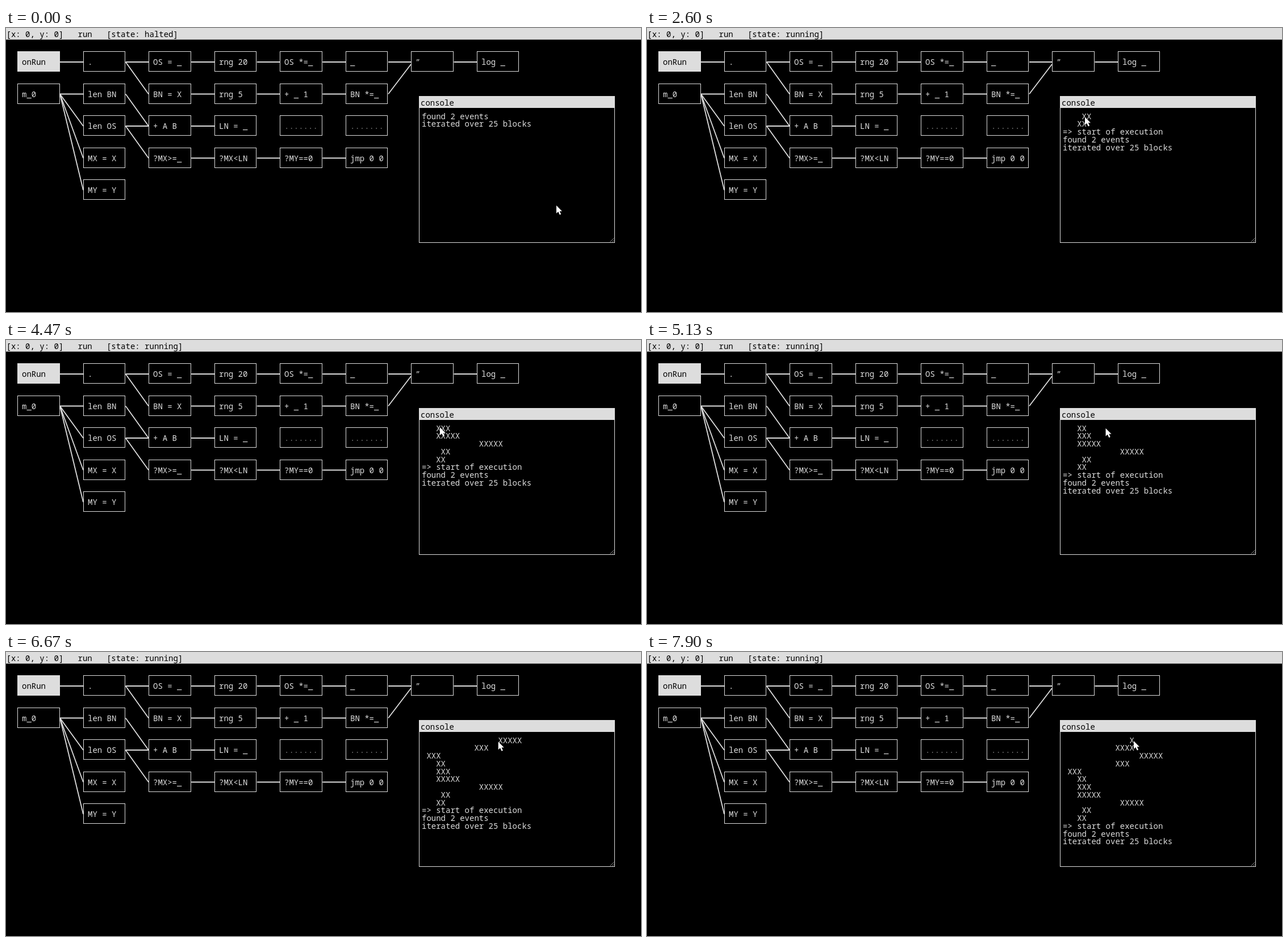
Animation, 1118 px wide and 501 px high, one loop 8 s. Source, as an HTML page with a canvas:

```html
<!DOCTYPE html>
<html>
<head>
<meta charset="utf-8">
<style>
  html, body { margin: 0; width: 100%; height: 100%; overflow: hidden; background: #000; }
  canvas { display: block; }
</style>
</head>
<body>
<canvas width="1118" height="501"></canvas>
<script>
const ctx = document.querySelector('canvas').getContext('2d');
const LOOP = 8000, START = 1130, LIGHT = '#ddd';
const FONT = '14px "Noto Sans Mono", monospace';

// Block labels by row, an empty label leaves the cell free.
const grid = [
  'onRun|.|OS = _|rng 20|OS *=_|_|”|log _',
  'm_0|len BN|BN = X|rng 5|+ _ 1|BN *=_',
  '|len OS|+ A B|LN = _|.......|.......',
  '|MX = X|?MX>=_|?MX<LN|?MY==0|jmp 0 0',
  '|MY = Y',
].map(row => row.split('|'));

// Wires leaving each block: "column,row" to rows of the next column.
const wires = {
  '0,0': [0], '1,0': [0, 1], '2,0': [0], '3,0': [0], '4,0': [0], '5,0': [0], '6,0': [0],
  '0,1': [1, 2, 3, 4], '1,1': [2], '2,1': [1], '3,1': [1], '4,1': [1], '5,1': [0.07],
  '1,2': [2, 3], '2,2': [2], '2,3': [3], '3,3': [3], '4,3': [3],
};

// Pointer glides: departure, duration, destination.
const glides = [
  { at: 570, ms: 230, x: 899, y: 257 },
  { at: 1670, ms: 560, x: 771, y: 157 },
  { at: 2740, ms: 530, x: 855, y: 156 },
  { at: 3530, ms: 520, x: 764, y: 154 },
  { at: 4630, ms: 300, x: 834, y: 156 },
  { at: 5000, ms: 330, x: 758, y: 155 },
  { at: 5500, ms: 300, x: 753, y: 155 },
  { at: 5960, ms: 310, x: 836, y: 157 },
  { at: 6400, ms: 690, x: 926, y: 161 },
  { at: 7130, ms: 400, x: 857, y: 157 },
];

// Each click on the newest row of X prints another one.
const prints = [
  [START, '   XX'], [2240, '    XX'], [2730, ' '.repeat(12) + 'XXXXX'], [3500, '   XXXXX'],
  [4080, '   XXX'], [4600, '   XX'], [5470, ' XXX'], [5930, ' '.repeat(11) + 'XXX'],
  [6370, ' '.repeat(16) + 'XXXXX'], [6800, ' '.repeat(11) + 'XXXX'], [7700, ' '.repeat(14) + 'X'],
];

const boxLeft = col => Math.round(20 + 115.5 * col);
const boxRight = col => Math.round(93.8 + 115.5 * col);
const boxTop = row => Math.round(41 + 56.6 * row);
const wireY = row => 60 + 56.5 * row;

function text(string, x, y, color = LIGHT) {
  ctx.fillStyle = color;
  ctx.fillText(string, x, y);
}

function bar(x, y, w, h) {
  ctx.fillStyle = LIGHT;
  ctx.fillRect(x, y, w, h);
}

function line(x1, y1, x2, y2) {
  ctx.beginPath();
  ctx.moveTo(x1, y1);
  ctx.lineTo(x2, y2);
  ctx.stroke();
}

function drawBlocks() {
  ctx.strokeStyle = LIGHT;
  ctx.lineWidth = 1.8;
  for (const from in wires) {
    const [col, row] = from.split(',').map(Number);
    for (const to of wires[from]) line(95 + 115.6 * col, wireY(row), boxLeft(col + 1), wireY(to));
  }
  ctx.lineWidth = 1;
  grid.forEach((labels, row) => labels.forEach((label, col) => {
    if (!label) return;
    const x = boxLeft(col), y = boxTop(row), w = boxRight(col) - x, active = label === 'onRun';
    if (active) bar(x, y, w + 1, 36);
    ctx.strokeRect(x + .5, y + .5, w, 35);
    text(label, x + 8, y + 24, active ? '#000' : label === '.......' ? '#777' : LIGHT);
  }));
}

function drawConsole(time) {
  ctx.strokeRect(727.5, 120.5, 344, 258);
  bar(727, 120, 345, 21);
  text('console', 730, 136.5, '#000');

  const lines = ['iterated over 25 blocks', 'found 2 events'];
  if (time >= START) lines.push('=> start of execution');
  for (const [at, row] of prints) if (time >= at) lines.push(row);
  ctx.font = '500 ' + FONT;
  lines.reverse().forEach((string, i) => text(string, 732, 160.5 + 13.75 * i));
  ctx.font = FONT;

  ctx.strokeStyle = '#888';
  line(1063.5, 377.5, 1070.5, 370.5);
  line(1067.5, 377.5, 1070.5, 374.5);
}

function drawPointer(time) {
  let px = 969, py = 313;
  for (const { at, ms, x, y } of glides) {
    const p = Math.min(1, Math.max(0, (time - at) / ms)), ease = p * p * (3 - 2 * p);
    px += (x - px) * ease;
    py += (y - py) * ease;
  }
  const arrow = new Path2D('M0 0V14L3.3 11L5.8 16.5L8.2 15.4L5.8 10.2H10Z');
  ctx.save();
  ctx.translate(px, py);
  ctx.fillStyle = '#fff';
  ctx.strokeStyle = '#000';
  ctx.stroke(arrow);
  ctx.fill(arrow);
  ctx.restore();
}

function draw() {
  const time = performance.now() % LOOP;
  ctx.fillStyle = '#000';
  ctx.fillRect(0, 0, 1118, 501);
  ctx.font = FONT;
  bar(0, 0, 1118, 20.5);
  text(`[x: 0, y: 0]   run   [state: ${time < START ? 'halted' : 'running'}]`, .5, 15.5, '#000');
  drawBlocks();
  drawConsole(time);
  drawPointer(time);
  requestAnimationFrame(draw);
}
draw();
</script>
</body>
</html>
```
